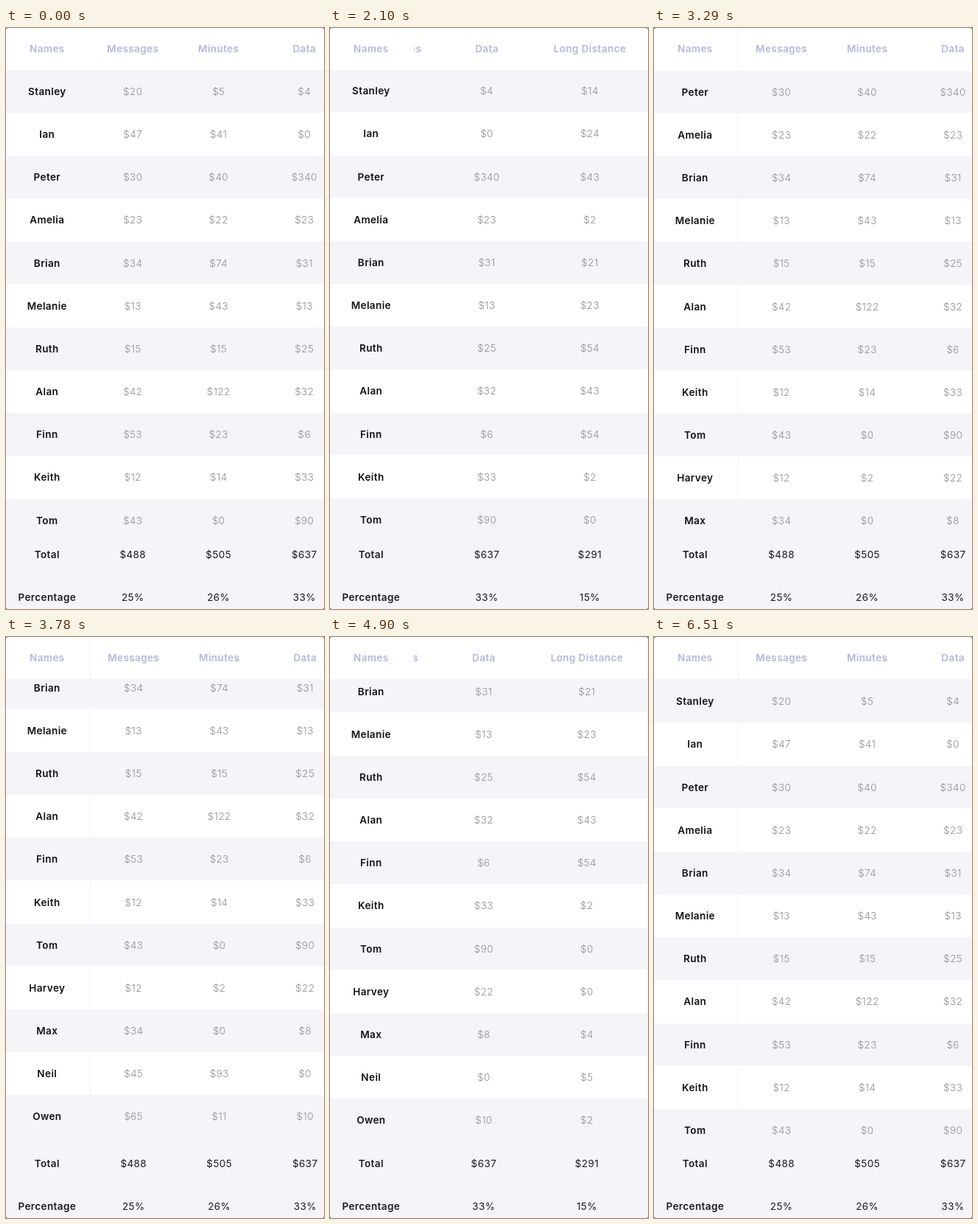
An HTML page with a canvas that plays this animation: 432 by 788 pixels, repeating every 6.58 s.

```html
<!DOCTYPE html>
<html lang="en">
<head>
<meta charset="utf-8">
<title>Scrolling table</title>
<style>
  html, body { margin: 0; width: 100%; height: 100%; overflow: hidden; background: #444; }
  canvas { display: block; border-radius: 2.5px; }
</style>
</head>
<body>
<canvas id="stage" width="432" height="788"></canvas>
<script>
const ctx = document.getElementById('stage').getContext('2d');
const W = 432, H = 788, HEAD = 57, FOOT = 685, NAME_W = 114;
const COL_W = 116.5, LAST_W = 163.5, ROW_H = 58.17;
const LOOP = 6580, STEP = 70;
const GRAY = '#f4f4f9';

const titles = ['Names', 'Messages', 'Minutes', 'Data', 'Long Distance'];
const rows = `
  Stanley $20 $5 $4 $14
  Ian $47 $41 $0 $24
  Peter $30 $40 $340 $43
  Amelia $23 $22 $23 $2
  Brian $34 $74 $31 $21
  Melanie $13 $43 $13 $23
  Ruth $15 $15 $25 $54
  Alan $42 $122 $32 $43
  Finn $53 $23 $6 $54
  Keith $12 $14 $33 $2
  Tom $43 $0 $90 $0
  Harvey $12 $2 $22 $0
  Max $34 $0 $8 $4
  Neil $45 $93 $0 $5
  Owen $65 $11 $10 $2`.trim().split('\n').map(line => line.trim().split(' '));

const sums = titles.map((_, c) => rows.reduce((sum, row) => sum + Number(row[c].slice(1)), 0));
const grand = sums.slice(1).reduce((a, b) => a + b);
const totals = sums.map((sum, c) => c ? '$' + sum : 'Total');
const shares = sums.map((sum, c) => c ? Math.round(100 * sum / grand) + '%' : 'Percentage');

const DATA_END = NAME_W + 3 * COL_W + LAST_W;
const MAX_X = DATA_END - W, MAX_Y = 245;

// Each swipe springs the table to a new offset
const swipes = [
  { at: 1000, x: MAX_X, y: 0 },
  { at: 2077, x: -1, y: 51.4 },
  { at: 3150, x: -1, y: MAX_Y },
  { at: 4000, x: MAX_X, y: MAX_Y },
  { at: 5110, x: -1, y: -1.5 }
];

// Damped spring from 0 to 1 that overshoots by 2.5 %
function spring(ms) {
  if (ms <= 0) return 0;
  const turn = 0.005 * ms, damping = Math.log(40) / Math.PI;
  return 1 - Math.exp(-damping * turn) * (Math.cos(turn) + damping * Math.sin(turn));
}

function offset(axis, t) {
  return swipes.reduce((sum, swipe, i) => {
    const from = i ? swipes[i - 1][axis] : 0;
    return sum + (swipe[axis] - from) * spring(t - swipe.at);
  }, 0);
}

function columnX(c) {
  if (c === 0) return 55.8;
  const width = c === 4 ? LAST_W : COL_W;
  return NAME_W + (c - 1) * COL_W + width / 2;
}

function rect(color, left, top, right, bottom) {
  ctx.fillStyle = color;
  ctx.fillRect(left, top, right - left, bottom - top);
}

function label(text, x, y, weight, color) {
  ctx.font = `${weight} 13.5px Inter, "Open Sans", sans-serif`;
  ctx.fillStyle = color;
  ctx.fillText(text, x, Math.round(y + 4.9));
}

function clipped(left, top, right, bottom, paint) {
  ctx.save();
  ctx.beginPath();
  ctx.rect(left, top, right - left, bottom - top);
  ctx.clip();
  paint();
  ctx.restore();
}

// White bands, header, cells and footer of the given columns
function pane(left, right, x, y, columns) {
  rect('#fff', left, 0, right, HEAD);
  clipped(0, HEAD, W, FOOT, () => rows.forEach((row, i) => {
    const mid = 86 + ROW_H * i - y;
    if (i % 2) rect('#fff', left, Math.floor(mid - ROW_H / 2), right, Math.round(mid + ROW_H / 2));
    for (const c of columns) {
      label(row[c], columnX(c) - x, mid, c ? 300 : 600, c ? '#8f8f94' : '#111113');
    }
  }));
  for (const c of columns) {
    const cx = columnX(c) - x, weight = c ? 400 : 600;
    label(titles[c], cx, 28, 600, '#b4b8da');
    label(totals[c], cx, 714, weight, '#1c1c1f');
    label(shares[c], cx, 772, weight, '#1c1c1f');
  }
}

function draw(t) {
  const x = offset('x', t), y = offset('y', t);
  ctx.textAlign = 'center';
  ctx.letterSpacing = '0.4px';
  rect(GRAY, 0, 0, W, H);
  clipped(NAME_W, 0, W, H, () => pane(NAME_W - x, DATA_END - x, x, y, [1, 2, 3, 4]));
  clipped(0, 0, NAME_W, H, () => pane(0, NAME_W, 0, y, [0]));
}

function tick() {
  const t = performance.now() % LOOP;
  draw(Math.floor(t / STEP) * STEP);
  requestAnimationFrame(tick);
}
tick();
</script>
</body>
</html>
```
